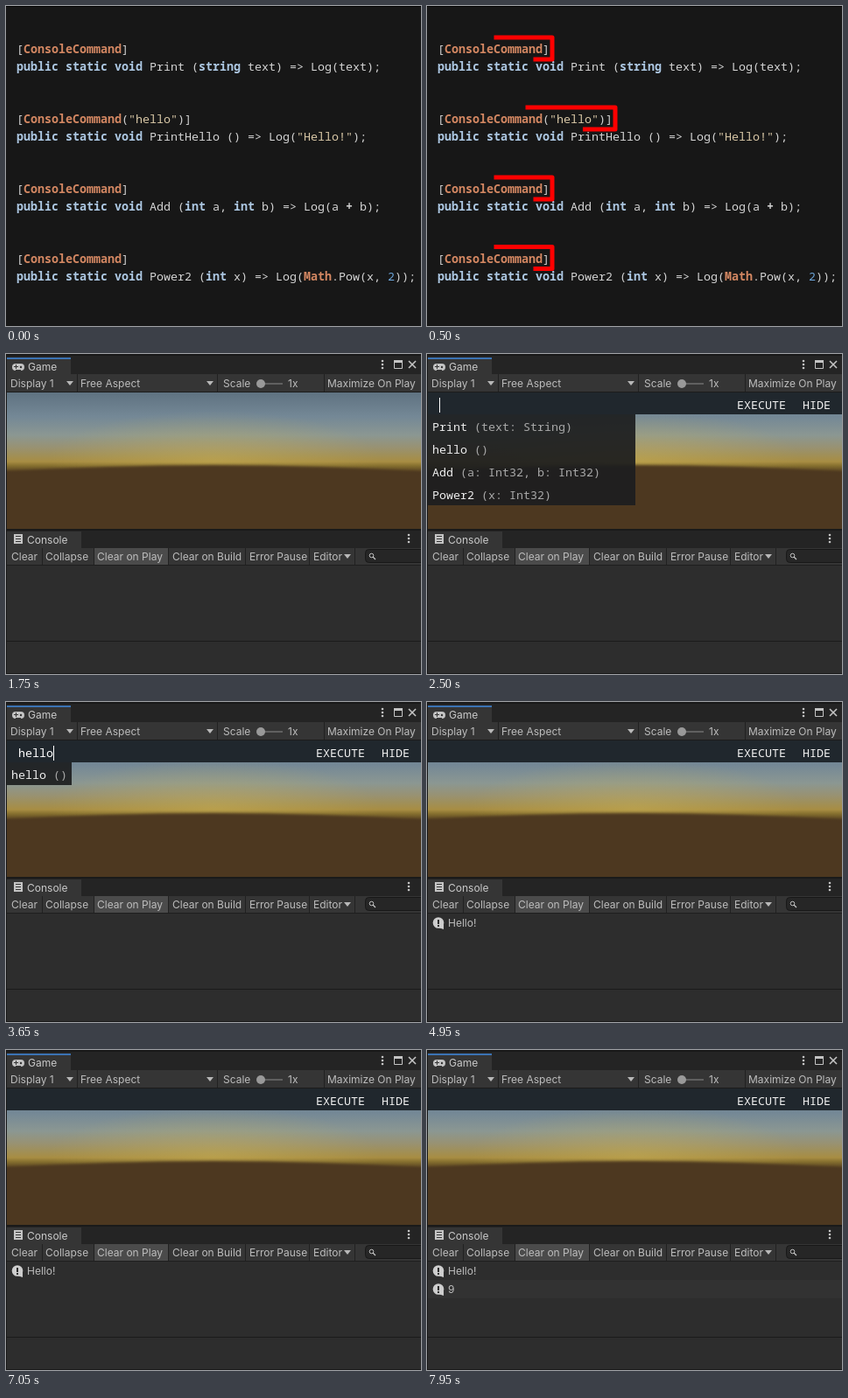
Animation of 474x366 px, one loop 8000 ms. Source, as an HTML page with a canvas:

```html
<!DOCTYPE html>
<html lang="en">
<head>
<meta charset="utf-8">
<title>Console commands</title>
<style>
html, body { margin: 0; width: 100%; height: 100%; overflow: hidden; background: #171717; }
canvas { display: block; }
</style>
</head>
<body>
<canvas id="stage" width="474" height="366"></canvas>
<script>
const ctx = document.getElementById('stage').getContext('2d');
const LOOP = 8000;
const MONO = '13.333px "Noto Sans Mono", "DejaVu Sans Mono", monospace';
const UI = '12px Inter, Roboto, sans-serif';
const CHAR = 8;

function box(x, y, w, h, color) {
  ctx.fillStyle = color;
  ctx.fillRect(x, y, w, h);
}

function label(text, x, y, color = '#bdbdbd', font = UI) {
  ctx.font = font;
  ctx.fillStyle = color;
  ctx.fillText(text, x, y);
}

function shape(points, color) {
  ctx.fillStyle = color;
  ctx.beginPath();
  for (const [x, y] of points) ctx.lineTo(x, y);
  ctx.fill();
}

function line(points, color, width = 1) {
  ctx.strokeStyle = color;
  ctx.lineWidth = width;
  ctx.beginPath();
  for (const [x, y] of points) ctx.lineTo(x, y);
  ctx.stroke();
}

function dot(x, y, r, color) {
  ctx.fillStyle = color;
  ctx.beginPath();
  ctx.arc(x, y, r, 0, 7);
  ctx.fill();
}

// Code listing

const CODE = [
  ['[ConsoleCommand]', 'public static void Print (string text) => Log(text);'],
  ['[ConsoleCommand("hello")]', 'public static void PrintHello () => Log("Hello!");'],
  ['[ConsoleCommand]', 'public static void Add (int a, int b) => Log(a + b);'],
  ['[ConsoleCommand]', 'public static void Power2 (int x) => Log(Math.Pow(x, 2));']
];
const TOKEN = /\b(?:public|static|void|string|int)\b|ConsoleCommand|Math|"[^"]*"|\b2\b|\+|[^\s]/g;

function tokenStyle(token) {
  if (/^(public|static|void|string|int)$/.test(token)) return ['#adc8e3', true];
  if (/^(ConsoleCommand|Math)$/.test(token)) return ['#d38762', true];
  if (token[0] === '"') return ['#d8c7a6', false];
  if (token === '2') return ['#6ca5d9', false];
  return ['#d4d4d4', token === '+'];
}

function codeLine(text, y) {
  // Identifiers ending in 2 are not numbers, so \b2\b only runs on a fresh word.
  for (const m of text.matchAll(TOKEN)) {
    const inWord = m[0] === '2' && /\w/.test(text[m.index - 1]);
    const [color, bold] = inWord ? ['#d4d4d4', false] : tokenStyle(m[0]);
    label(m[0], 12 + m.index * CHAR, y, color, (bold ? 'bold ' : '') + MONO);
  }
}

function outline(x, y, w, h, progress) {
  const total = 2 * (w + h), mid = x + w / 2;
  ctx.setLineDash([total * progress, total]);
  line([[mid, y], [x + w, y], [x + w, y + h], [x, y + h], [x, y], [mid, y]], '#fe0000', 5);
  ctx.setLineDash([]);
}

function codeScene(t) {
  box(0, 0, 474, 366, '#171717');
  box(0, 0, 474, 1, '#050505');
  CODE.forEach(([attribute, method], i) => {
    codeLine(attribute, 54 + i * 80);
    codeLine(method, 74 + i * 80);
  });
  const progress = Math.min(1, (Math.max(0, t - 20) / 1030) ** 1.35);
  if (!progress) return;
  ctx.lineJoin = 'round';
  CODE.forEach((_, i) => outline(10, 36 + i * 80 - (i === 3 ? 0.5 : 0), i === 1 ? 205 : 133, 25, progress));
}

// Editor window

function arrow(x, y) {
  shape([[x, y], [x + 8, y], [x + 4, y + 5]], '#b8b8b8');
}

function menuDots(x, y) {
  for (const dy of [-4, 0, 4]) dot(x, y + dy, 1.3, '#c4c4c4');
}

function sky() {
  const g = ctx.createLinearGradient(0, 44, 0, 136);
  [[0, '#5f7281'], [0.3, '#748896'], [0.53, '#8b9792'], [0.68, '#989273'],
   [0.79, '#a18f55'], [0.86, '#a88d43'], [0.91, '#86702f'], [1, '#4f3a20']]
    .forEach(([at, color]) => g.addColorStop(at, color));
  ctx.save();
  ctx.beginPath();
  ctx.rect(1, 44, 473, 156);
  ctx.clip();
  box(1, 44, 473, 156, g);

  ctx.save();
  ctx.translate(237, 122);
  ctx.scale(1, 0.3);
  const glow = ctx.createRadialGradient(0, 0, 0, 0, 0, 190);
  glow.addColorStop(0, 'rgba(205,180,85,.45)');
  glow.addColorStop(1, 'rgba(205,180,85,0)');
  box(-237, -190, 474, 380, glow);
  ctx.restore();

  ctx.filter = 'blur(1.5px)';
  ctx.fillStyle = '#4d3820';
  ctx.beginPath();
  ctx.moveTo(-10, 135);
  ctx.quadraticCurveTo(237, 119, 484, 135);
  ctx.lineTo(484, 210);
  ctx.lineTo(-10, 210);
  ctx.fill();
  ctx.restore();
}

function gamePanel() {
  box(0, 2, 474, 21, '#242424');
  box(1, 4, 73, 19, '#353535');
  box(1, 4, 73, 2, '#3b73b4');
  ctx.fillStyle = '#c4c4c4';
  ctx.beginPath();
  ctx.roundRect(7, 11, 14, 8, 4);
  ctx.fill();
  box(9, 14, 5, 1, '#353535');
  box(11, 12, 1, 5, '#353535');
  dot(17, 15, 1.2, '#353535');
  box(11, 18, 6, 2, '#353535');
  label('Game', 25, 19, '#cacaca');
  menuDots(430, 12);
  line([[443.5, 7.5], [452.5, 7.5], [452.5, 16.5], [443.5, 16.5], [443.5, 7]], '#c4c4c4');
  box(443, 7, 10, 3, '#c4c4c4');
  line([[460, 8], [468, 16]], '#c4c4c4', 1.6);
  line([[468, 8], [460, 16]], '#c4c4c4', 1.6);

  box(0, 23, 474, 21, '#353535');
  for (const x of [81, 241, 363]) box(x, 23, 1, 20, '#212121');
  box(0, 43, 474, 1, '#1c1c1c');
  label('Display 1', 5, 38);
  arrow(69, 31);
  label('Free Aspect', 85, 38);
  arrow(229, 31);
  label('Scale', 248, 38);
  box(290, 33, 26, 2, '#606060');
  dot(291, 34, 5, '#999');
  label('1x', 322, 38);
  label('Maximize On Play', 367, 38);
  sky();
}

function consolePanel() {
  box(0, 200, 474, 2, '#1a1a1a');
  box(0, 202, 474, 20, '#242424');
  box(1, 203, 85, 19, '#353535');
  box(9, 206, 10, 11, '#c4c4c4');
  for (const y of [208, 211, 214]) box(11, y, 6, 1, '#353535');
  label('Console', 24, 217, '#cacaca');
  menuDots(460, 211);

  box(0, 222, 474, 20, '#353535');
  box(101, 222, 84, 19, '#4b4b4b');
  for (const x of [41, 100, 185, 273, 346, 398]) box(x, 222, 1, 19, '#212121');
  box(0, 241, 474, 1, '#1e1e1e');
  [['Clear', 6], ['Collapse', 45], ['Clear on Play', 104], ['Clear on Build', 190],
   ['Error Pause', 278], ['Editor', 351]].forEach(([text, x]) => label(text, x, 236));
  arrow(386, 229);
  ctx.fillStyle = '#262626';
  ctx.strokeStyle = '#181818';
  ctx.lineWidth = 1;
  ctx.beginPath();
  ctx.roundRect(410.5, 223.5, 70, 15, 4);
  ctx.fill();
  ctx.stroke();
  ctx.strokeStyle = '#c4c4c4';
  ctx.beginPath();
  ctx.arc(417.5, 230.5, 2.3, 0, 7);
  ctx.stroke();
  line([[419, 232], [422, 235]], '#c4c4c4', 1.3);

  box(0, 242, 474, 124, '#2d2d2d');
  box(0, 328, 474, 1, '#1a1a1a');
  box(0, 365, 474, 1, '#1a1a1a');
}

function logRow(text, row) {
  const y = 253 + row * 21;
  if (row % 2) box(1, y - 11, 473, 21, '#323232');
  dot(13, y - 0.5, 6.3, '#cdcdcd');
  shape([[13, y + 5], [19, y + 1], [19, y + 7]], '#cdcdcd');
  box(12, y - 4, 2, 5, '#2d2d2d');
  box(12, y + 2, 2, 2, '#2d2d2d');
  label(text, 24, y + 4);
}

// Command overlay

const COMMANDS = [['Print', '(text: String)'], ['hello', '()'],
  ['Add', '(a: Int32, b: Int32)'], ['Power2', '(x: Int32)']];
const TYPING = [
  [1850, ''], [2450, ' '], [3100, ' h'], [3200, ' he'], [3300, ' hel'], [3450, ' hell'],
  [3650, ' hello'], [4450, null], [5000, ''], [5050, 'a'], [5200, 'ad'], [5350, 'add'],
  [5400, 'add '], [5450, 'add 2'], [5650, 'add 2 '], [6150, 'add 2 7'], [7050, null]
];
const LOGS = [[4650, 'Hello!'], [7150, '9']];

function suggestions(input) {
  const word = input.trim().split(' ')[0];
  const found = COMMANDS.filter(([name]) => name.toLowerCase().startsWith(word));
  const longest = Math.max(...found.map(c => c.join(' ').length));
  const width = word ? longest * CHAR + 10 : 237;
  box(1, 69, width, found.length * 26, 'rgba(29,30,31,.92)');
  found.forEach(([name, args], i) => {
    label(name, 6, 88 + i * 26, '#ededed', MONO);
    label(args, 6 + (name.length + 1) * CHAR, 88 + i * 26, '#a9a9a9', MONO);
  });
}

function overlay(t) {
  const input = TYPING.filter(([at]) => at <= t).pop()?.[1] ?? null;
  box(1, 44, 473, 25, '#20272d');
  label('EXECUTE', 354, 63, '#f0f0f0', MONO);
  label('HIDE', 429, 63, '#f0f0f0', MONO);
  if (input === null) return;
  label(input, 6, 63, '#fff', MONO);
  box(6 + input.length * CHAR, 50, 1, 17, '#fff');
  if (input) suggestions(input);
}

function editorScene(t) {
  box(0, 0, 474, 366, '#191919');
  gamePanel();
  consolePanel();
  LOGS.forEach(([at, text], row) => t >= at && logRow(text, row));
  if (t >= 1800) overlay(t);
  box(0, 0, 1, 366, '#191919');
}

function frame() {
  const t = performance.now() % LOOP;
  (t < 1750 ? codeScene : editorScene)(t);
  requestAnimationFrame(frame);
}
frame();
</script>
</body>
</html>
```
